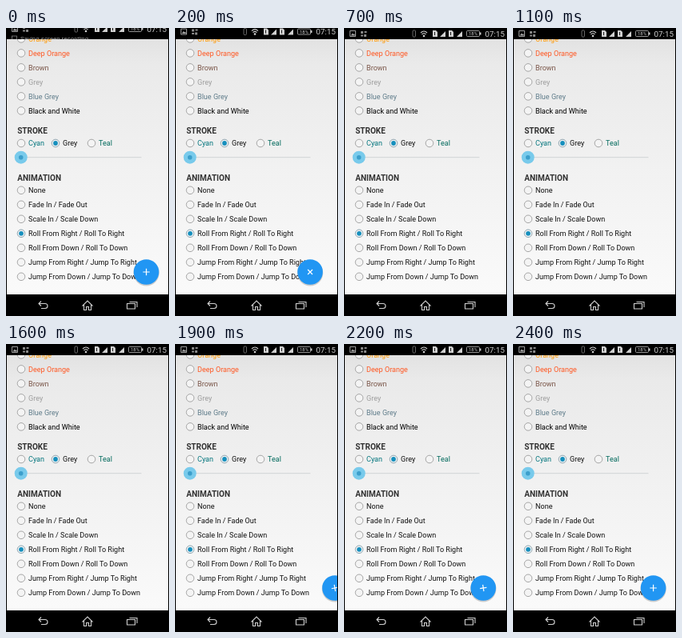
Write an HTML page that moves like this. It is 204 px wide and 360 px high and loops after 2500 ms.

```html
<!DOCTYPE html>
<html lang="en">
<head>
<meta charset="utf-8">
<title>Floating button settings</title>
<style>
  html, body { margin: 0; height: 100%; overflow: hidden; background: #000; }
  svg { display: block; width: 100vw; height: 100vh; font: 9.07px Roboto, sans-serif; }
  .head { font-size: 10px; font-weight: 700; fill: #333; }
  .line { fill: none; stroke: #cfcfcf; stroke-width: 1.1; }
</style>
</head>
<body>
<svg viewBox="0 0 204 360">
  <defs>
    <linearGradient id="page" x2="0" y2="1">
      <stop stop-color="#e2e2e2"/><stop offset=".1" stop-color="#eaeaea"/>
      <stop offset="1" stop-color="#fafafa"/>
    </linearGradient>
    <clipPath id="screen"><path d="M1 14H203V333H1z"/></clipPath>
    <clipPath id="bar"><path d="M0 0H204V14H0z"/></clipPath>
  </defs>
  <rect width="204" height="360"/>
  <g clip-path="url(#screen)">
    <rect x="1" y="14" width="202" height="319" fill="url(#page)"/>
    <g id="list"></g>
    <text class="head" x="14.200" y="131.600">STROKE</text>
    <text class="head" x="14.200" y="190.700">ANIMATION</text>
    <path d="M19 161.700H169.500" stroke="#d0d4d5"/>
    <circle cx="18.700" cy="161.700" r="8" fill="#78caeb"/>
    <circle cx="18.700" cy="161.700" r="2.800" fill="#3c9fcc"/>
    <g id="fab">
      <circle cy="1.200" r="16.200" opacity=".18"/>
      <circle r="15.800" fill="#2196f3"/>
      <path id="plus" d="M-4.200 0H4.200M0-4.200V4.200" stroke="#fff" stroke-width="1.200"/>
    </g>
  </g>
  <g clip-path="url(#bar)">
    <g id="status" fill="#d0d0d0">
      <path d="M7.500 3.500h7v7h-7z" fill="none" stroke="#aaa" stroke-width=".9"/>
      <path d="M8.500 9.500l2-3 1.500 1.500 1-1 1 2.500z" opacity=".8"/>
      <path d="M21 4h3v3h-3zM25.500 4h3v2h-3zM21 8.500h3v2h-3zM25 8h3v3h-3z" opacity=".65"/>
      <rect x="86" y="3" width="3.500" height="8" rx="1" fill="none" stroke="#666"/>
      <path class="line" d="M96 6q4-4 8 0M97.500 8q2.500-2.500 5 0"/>
      <circle cx="100" cy="10" r="1.300"/>
      <path d="M111 3h4l2 2v6h-6zM131 3h4l2 2v6h-6zM120 11l7-7v7zM141 11l7-7v7z"/>
      <path d="M113.500 5v4M133.500 5v4" stroke="#222"/>
      <rect x="153.500" y="3.500" width="16" height="7" rx="1" fill="none" stroke="#bbb" stroke-width=".8"/>
      <path d="M170 5.500h1.500v3H170z"/>
      <text x="156" y="9.200" font-size="6">18%</text>
      <text x="201" y="10.500" font-size="9.800" text-anchor="end">07:15</text>
    </g>
    <g id="ticker" fill="#999">
      <rect x="7.500" y="4" width="6" height="6" fill="none" stroke="#888" stroke-width=".8"/>
      <text x="18" y="9.800" font-size="8">Saving screen recording</text>
    </g>
  </g>
  <g class="line">
    <path d="M44 341.500l-3 3 3 3M41.500 344.500H49a3 3 0 0 1 0 6H44"/>
    <path d="M95.500 347.500L102 341l6.500 6.500M97.500 346v6.500h3v-4h3v4h3V346"/>
    <path d="M151.500 344.500h10v6.500h-10zM154.500 342.500h9.500v6.500"/>
  </g>
</svg>
<script>
const $ = id => document.getElementById(id);

const radio = (x, y, label, color = '#111', on) => `
  <circle cx="${x}" cy="${y}" r="4.8" fill="#f4f4f4" stroke="${on ? '#7d98a4' : '#999'}" stroke-width=".85"/>
  ${on ? `<circle cx="${x}" cy="${y}" r="2.9" fill="#168fbd"/>` : ''}
  <text x="${x + 9}" y="${y + 3.2}" fill="${color}">${label}</text>`;

const colors = [['Orange', '#ff9800'], ['Deep Orange', '#ff5722'], ['Brown', '#795548'],
  ['Grey', '#9e9e9e'], ['Blue Grey', '#607d8b'], ['Black and White', '#000']];
const moves = ['None', 'Fade In / Fade Out', 'Scale In / Scale Down',
  'Roll From Right / Roll To Right', 'Roll From Down / Roll To Down',
  'Jump From Right / Jump To Right', 'Jump From Down / Jump To Down'];

$('list').innerHTML =
  colors.map(([name, color], i) => radio(19, 13.4 + 18 * i, name, color)).join('') +
  radio(19, 144, 'Cyan', '#00747c') + radio(62, 144, 'Grey', '#111', true) +
  radio(107, 144, 'Teal', '#00695c') +
  moves.map((name, i) => radio(19, 202.8 + 18 * i, name, '#111', i === 3)).join('');

const LOOP = 2500, ROLL = 400, SHOW = 1850;
const clamp = v => Math.min(1, Math.max(0, v));
const anticipate = u => u * u * (3 * u - 2);

function draw(t) {
  // Hiding pulls back before rolling out; showing runs the same curve in reverse.
  const out = anticipate(t < SHOW ? clamp(t / ROLL) : 1 - clamp((t - SHOW) / ROLL));
  $('fab').setAttribute('transform', `translate(${175.6 + 52 * out} 305)`);
  $('plus').setAttribute('transform', `rotate(${360 * out})`);

  // The status icons slide in from above while the ticker leaves below.
  const left = (1 - clamp(t / 400)) ** 1.3;
  $('status').setAttribute('transform', `translate(0 ${-6 * left})`);
  $('ticker').setAttribute('transform', `translate(0 ${14 - 8 * left})`);
  $('ticker').setAttribute('opacity', left ** 2);
}

const start = performance.now();
function tick() {
  draw((performance.now() - start) % LOOP);
  requestAnimationFrame(tick);
}
tick();
</script>
</body>
</html>
```
